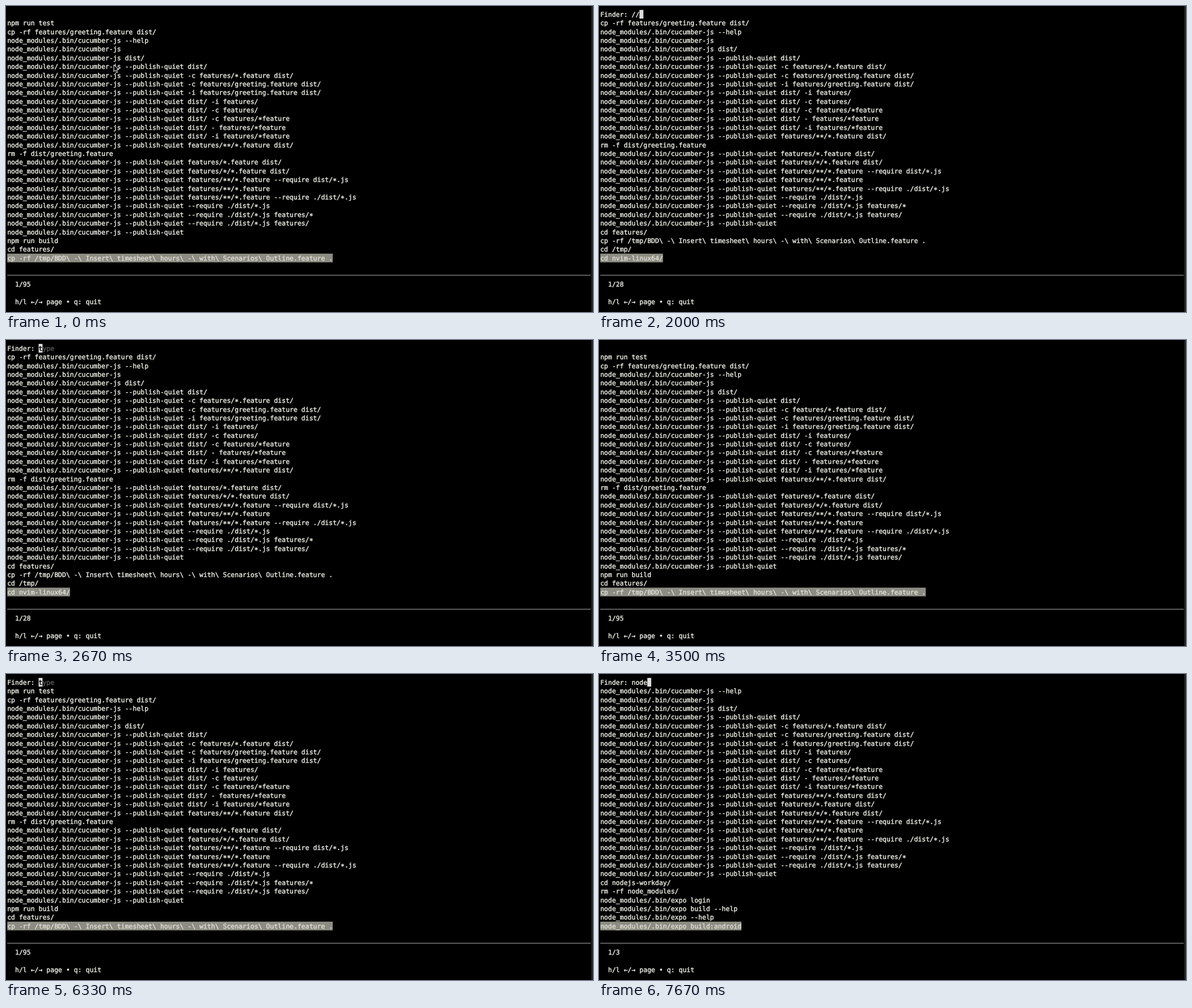
Write an HTML page with a canvas that moves like this. It is 1035 by 541 pixels and loops after 8000 ms.

```html
<!DOCTYPE html>
<html lang="en">
<head>
<meta charset="utf-8">
<title>Command history finder</title>
<style>
html, body { margin: 0; width: 100%; height: 100%; overflow: hidden; background: #000; }
canvas { display: block; width: 1035px; height: 541px; }
</style>
</head>
<body>
<canvas id="stage" width="1035" height="541"></canvas>
<script>
const ctx = document.getElementById('stage').getContext('2d');
const W = 1035, H = 541, LOOP = 8000;
const CELL = 6.915, ROW = 15.39, LEFT = 2.2, TOP = 6.9, EDGE = 1031;
const FG = '#e8e8e0', DIM = '#585858', BLACK = '#000';
const CURSOR = '#dddddd', SELECTED = '#8c8c82', PICKED = '#dcdcd4';

const bin = 'node_modules/.bin/';
const cuke = bin + 'cucumber-js';
const quiet = args => `${cuke} --publish-quiet${args ? ' ' + args : ''}`;

const recent = [
  'npm run test',
  'cp -rf features/greeting.feature dist/',
  cuke + ' --help',
  cuke,
  cuke + ' dist/',
  ...[
    'dist/',
    '-c features/*.feature dist/',
    '-c features/greeting.feature dist/',
    '-i features/greeting.feature dist/',
    'dist/ -i features/',
    'dist/ -c features/',
    'dist/ -c features/*feature',
    'dist/ - features/*feature',
    'dist/ -i features/*feature',
    'features/**/*.feature dist/'
  ].map(quiet),
  'rm -f dist/greeting.feature',
  ...[
    'features/*.feature dist/',
    'features/*/*.feature dist/',
    'features/**/*.feature --require dist/*.js',
    'features/**/*.feature',
    'features/**/*.feature --require ./dist/*.js',
    '--require ./dist/*.js',
    '--require ./dist/*.js features/*',
    '--require ./dist/*.js features/',
    ''
  ].map(quiet),
  'npm run build',
  'cd features/',
  'cp -rf /tmp/BDD\\ -\\ Insert\\ timesheet\\ hours\\ -\\ with\\ Scenarios\\ Outline.feature .'
];

const slash = [...recent.filter(s => s.includes('/')), 'cd /tmp/', 'cd nvim-linux64/'];

const node = [
  ...recent.filter(s => s.includes('node')),
  'cd nodejs-workday/',
  'rm -rf node_modules/',
  ...['login', 'build --help', '--help', 'build:android'].map(s => bin + 'expo ' + s)
];

const mongo = (user, pass) =>
  `mongodb+srv://${user}:${pass}@cluster0.60kab2j.mongodb.net/?retryWrites=true&w=majority`;
const pass = 'hxR4TmB6qL';
const mail = 'sandrelkkmoura@mail.test';
const keyHead = 'AAAAB3NzaC1yc2EAAAADAQABAAABgQDANVh/1KBfPmHG7';
const keyTail = 'RK78WC9AiiyItv/8yLfxzXh4/K9DDroFbRfm8xwjpBkXWFM=';
const secret = '..._credentials&scope=api.organization&client_id=<ID>&client_secret=<SECRET>';
const zone = '-388415 --zone northamerica-northeast1-a -- -4 -L 8888:127.0.0.1:8888';
const projects = 'ssh https://www.googleapis.com/compute/v1/projects/';
const tee = 'main" | sudo tee -a /etc/apt/sources.list.d/google-cloud-sdk.list';
const clover = 'https://github.com/tolwick/clover';

const links = [
  'deno run -A -r https://fresh.deno.dev my-project',
  'deno run -A -r https://alephjs.org/init.ts --template=react',
  `export MONGO_URI="${mongo('maple', 'pN5vGcQJY3ra8Ws4')}"`,
  "// or, if you don't need persistency",
  'go1.19.3 get ' + clover,
  'go1.19.3 mod get ' + clover,
  'go1.19.3 install ' + clover,
  `export MONGO_URI=${mongo('root', pass)}`,
  `export MONGO_URI="${mongo('root', pass)}"`,
  `export GITHUB_TOKEN="ssh-rsa ${keyHead}...${keyTail} ${mail}"`,
  `export GITHUB_TOKEN="${keyHead}pywrxoT4...egY7NcY5kNCDfaa9uHcnX02Cg${keyTail}"`,
  `export MONGO_URI="${mongo('maple', pass)}"`,
  'git remote add origin https://github.com/button-inc/bdd-typescript-test.git',
  `gpg --export ${mail} | curl -T - https://keys.openpgp.org`,
  'git clone https://github.com/bcgov/CONN-CCBC-portal.git',
  `export GITHUB_TOKEN="ssh-rsa ${keyHead}...g${keyTail} ${mail}"`,
  'curl -L https://github.com/kubernetes/kompose/releases/download/v1.28.0/kompose-linux-amd64 -o kompose',
  `curl -X POST   https://identity.bitwarden.com/connect/token   -H 'Content-${secret}`,
  `curl -X POST http://btw.local/identity/connect/token -H 'Content-Type: app${secret}`,
  `curl -X POST https://btw.local/identity/connect/token -H 'Content-Type: ap${secret}`,
  'deno run -A -r https://fresh.deno.dev',
  'git clone https://github.com/NvChad/NvChad.git',
  `gcloud beta compute ${projects}k8s...ndbox${zone}`,
  `gcloud compute ${projects}k8s-sand...ndbox${zone}`,
  'echo "deb https://packages.cloud.google.com/apt cloud-sdk ' + tee,
  'echo "deb [signed-by=/usr/share/keyrings/cloud.google.gpg] https://package...loud-sdk ' + tee,
  'curl https://packages.cloud.google.com/apt/doc/apt-key.gpg | sudo apt-key --keyring /usr/share/keyrings/cloud.google.gpg add -',
  'gi clone https://github.com/reedotter/pjs.git'
];

// query: null hides the finder, '' shows its placeholder
const scene = (at, query, lines, pages, mouse) => ({ at, query, lines, pages, mouse });
const scenes = [
  scene(0, null, recent, 95, [190, 104]),
  scene(1170, '', recent, 95),
  scene(1670, '/', recent, 95),
  scene(2000, '//', slash, 28),
  scene(2500, '/', links, 1),
  scene(2670, '', slash, 28),
  scene(2830, '', recent, 95),
  scene(3500, null, recent, 95),
  scene(5000, '', recent, 95),
  scene(5670, null, recent, 95),
  scene(6330, '', recent, 95),
  scene(6830, '', recent, 95, [200.5, 85.5]),
  scene(7330, 'no', recent, 95),
  scene(7670, 'node', node, 3)
];

const colX = col => LEFT + col * CELL;
const rowY = row => TOP + row * ROW;

// A hairline stroke gives the glyphs a medium weight
function write(text, col, row, color = FG) {
  ctx.fillStyle = ctx.strokeStyle = color;
  ctx.lineWidth = 0.45;
  [...text].forEach((ch, i) => {
    if (ch === ' ') return;
    const x = colX(col + i);
    const y = rowY(row) + 11.9 + (ch === '*' ? 2 : 0);
    ctx.fillText(ch, x, y);
    ctx.strokeText(ch, x, y);
  });
}

function block(col, row, count, color) {
  ctx.fillStyle = color;
  ctx.fillRect(colX(col), rowY(row), count * CELL, ROW);
}

function drawFinder(query) {
  if (query === null) return;
  write('Finder: ' + query, 0, 0);
  const col = 8 + query.length;
  block(col, 0, 1, CURSOR);
  if (!query) {
    write('t', col, 0, BLACK);
    write('ype', col + 1, 0, DIM);
  }
}

function drawList(lines) {
  const last = lines.length - 1;
  block(0, last + 1, lines[last].length, SELECTED);
  lines.forEach((line, i) => write(line, 0, i + 1, i === last ? PICKED : FG));
}

function drawMouse([x, y]) {
  const outline = [[0, 0], [0, 12], [2.8, 9.5], [5, 14], [7, 13], [5, 8.8], [8.8, 8.6]];
  ctx.beginPath();
  outline.forEach(([dx, dy]) => ctx.lineTo(x + dx, y + dy));
  ctx.closePath();
  ctx.fillStyle = BLACK;
  ctx.fill();
  ctx.strokeStyle = '#fff';
  ctx.lineWidth = 1;
  ctx.stroke();
}

function draw({ query, lines, pages, mouse }) {
  ctx.fillStyle = BLACK;
  ctx.fillRect(0, 0, W, H);
  ctx.fillStyle = '#262626';
  ctx.fillRect(1032, 0, 3, H);

  ctx.save();
  ctx.beginPath();
  ctx.rect(0, 0, EDGE, H);
  ctx.clip();
  ctx.font = '11.49px "DejaVu Sans Mono", monospace';
  ctx.textRendering = 'geometricPrecision';
  ctx.lineJoin = 'round';
  drawFinder(query);
  drawList(lines);
  ctx.fillStyle = '#b4b4b4';
  ctx.fillRect(LEFT, 475.5, EDGE - LEFT, 1);
  write(`1/${pages}`, 2, 31);
  write('h/l ←/→ page • q: quit', 2, 33);
  ctx.restore();

  if (mouse) drawMouse(mouse);
}

const start = performance.now();
let shown = null;

function tick() {
  const t = (performance.now() - start) % LOOP;
  const current = scenes.findLast(s => s.at <= t);
  if (current !== shown) draw(shown = current);
  requestAnimationFrame(tick);
}
tick();
</script>
</body>
</html>
```
